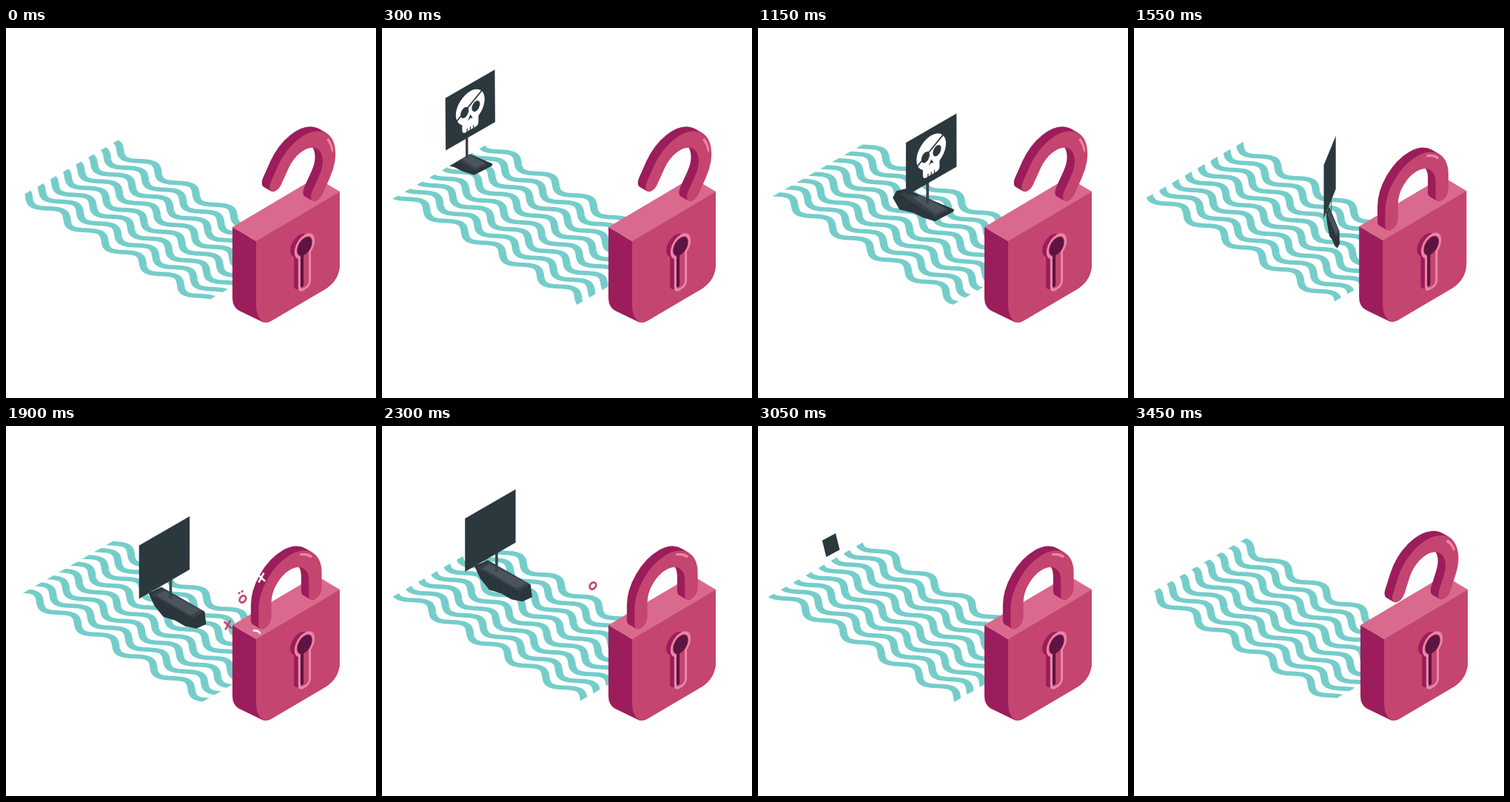
These frames come from a looping animation (500 by 500 pixels, 3500 ms). An HTML page with a canvas:

```html
<!DOCTYPE html>
<html lang="en">
<head>
<meta charset="utf-8">
<title>Padlock and pirate ship</title>
<style>
html, body { margin: 0; width: 100%; height: 100%; overflow: hidden; background: #fff; }
canvas { display: block; width: 500px; height: 500px; }
</style>
</head>
<body>
<canvas id="stage" width="500" height="500"></canvas>
<script>
const ctx = document.getElementById('stage').getContext('2d');
const LOOP = 3500;
const TAU = Math.PI * 2;
const COS = Math.cos(Math.PI / 6);
const COLOR = {
  water: '#75cdca', front: '#c4456f', side: '#9c1d5b', top: '#d9698d',
  rim: '#e985a6', hole: '#5e1441', flag: '#2b383d', hull: '#2b363c',
  deck: '#38424b', plank: '#4b545d'
};

const clamp01 = v => Math.max(0, Math.min(1, v));
const span = (t, a, b) => clamp01((t - a) / (b - a));
const easeOut = p => 1 - (1 - p) ** 3;

function group(draw) {
  ctx.save();
  draw();
  ctx.restore();
}

function fillPath(path, color) {
  ctx.fillStyle = color;
  ctx.fill(path);
}

function polygon(points, color) {
  ctx.beginPath();
  points.forEach(([x, y]) => ctx.lineTo(x, y));
  ctx.closePath();
  ctx.fillStyle = color;
  ctx.fill();
}

// Isometric planes: the water surface and the wall facing the viewer.
const groundPlane = () => ctx.transform(COS, 0.5, COS, -0.5, 24.3, 225);
const wallPlane = (x, y) => ctx.transform(COS, -0.5, 0, 1, x, y);

function clipGround(length, from, to) {
  group(() => {
    groundPlane();
    ctx.beginPath();
    ctx.rect(0, from, length, to - from);
  });
  ctx.clip();
}

function drawWater(t) {
  const length = 287, period = 59.1, amp = 7.9;
  const zero = 67.2 - 5 * period * t / LOOP;
  group(() => {
    clipGround(length, -30, 170);
    groundPlane();
    ctx.strokeStyle = COLOR.water;
    ctx.lineWidth = 8.3;
    for (let row = 0; row < 8; row++) {
      ctx.beginPath();
      for (let s = -20; s <= length + 20; s += 1.5) {
        ctx.lineTo(s, row * 19.3 - amp * Math.sin(TAU * (s - zero - row) / period));
      }
      ctx.stroke();
    }
  });
}

const HULL_OUT = {
  hull: [[-47, -8], [-42, -17], [-30, -20], [36, 8], [35, 11], [10, 24], [-6, 19], [-18, 13], [-38, 8]],
  deck: [[-38, -13], [-28, -16], [29, 9], [11, 18]],
  plank: [[-20, -8], [-10, -11], [26, 7], [11, 14]]
};
const HULL_BACK = {
  hull: [[-30, -8], [-12, -16], [46, 17], [48, 34], [35, 40], [20, 37], [6, 29], [-10, 24], [-22, 9]],
  deck: [[-26, -6], [-10, -14], [45, 17], [30, 26]],
  plank: [[-19, -5], [-9, -11], [40, 15], [27, 22]]
};

function drawSkull() {
  ctx.fillStyle = '#fff';
  ctx.beginPath();
  ctx.ellipse(0, -4, 23, 22, 0, 0, TAU);
  ctx.fill();
  ctx.beginPath();
  ctx.roundRect(-13, 8, 26, 19, 5);
  ctx.fill();
  ctx.fillStyle = ctx.strokeStyle = COLOR.flag;
  for (const x of [-9, 9]) {
    ctx.beginPath();
    ctx.ellipse(x, -1, 6.5, 7, 0, 0, TAU);
    ctx.fill();
  }
  polygon([[0, 6], [4, 13], [0, 11], [-4, 13]], COLOR.flag);
  ctx.lineWidth = 2.5;
  ctx.beginPath();
  ctx.moveTo(19, -18);
  ctx.lineTo(-22, 5);
  ctx.stroke();
  ctx.lineWidth = 1.5;
  for (const x of [-5, 0, 5]) {
    ctx.beginPath();
    ctx.moveTo(x, 23);
    ctx.lineTo(x, 28);
    ctx.stroke();
  }
}

function shipState(t) {
  const hit = 1430, leave = 1640;
  let travel;
  if (t < hit) travel = 58 + 0.1345 * (t - 600);
  else if (t < leave) travel = 169.6;
  else if (t < 2300) travel = 58 + 111.6 * (2300 - t) / (2300 - leave);
  else travel = 58 - 0.135 * (t - 2300);
  travel = Math.max(3, travel);
  const out = span(t, 2730, 3195);
  const size = t < hit ? easeOut(span(t, 140, 360)) : 1 - out;
  const turn = span(t, hit, leave);
  return {
    x: 97 + travel + 8 * out,
    y: 166 + travel * 0.54 + 16 * out,
    size,
    hullSize: clamp01(2 * size - 1),
    lean: 0.36 * (1 - size),
    squash: Math.max(0.03, Math.abs(Math.cos(Math.PI * turn))),
    back: turn > 0.5
  };
}

function drawShip(t) {
  const ship = shipState(t);
  if (ship.size <= 0.01) return;
  const place = size => {
    ctx.translate(ship.x, ship.y);
    ctx.transform(1, ship.lean / 2, ship.lean, 1, 0, 0);
    ctx.scale(size * ship.squash, size);
  };
  const parts = ship.back ? HULL_BACK : HULL_OUT;
  group(() => {
    clipGround(400, -100, 300);
    place(ship.hullSize);
    for (const name in parts) polygon(parts[name], COLOR[name]);
  });
  group(() => {
    place(ship.hullSize);
    ctx.fillStyle = COLOR.deck;
    ctx.fillRect(-1.8, -50, 3.6, 50);
  });
  group(() => {
    place(ship.size);
    wallPlane(ship.back ? -8.5 : 5, ship.back ? -56 : -66);
    ctx.fillStyle = COLOR.flag;
    ctx.fillRect(-39.5, -36, 79, 72);
    if (!ship.back) drawSkull();
  });
}

const BODY = new Path2D('M306 269L338 288L451 221V318Q451 341 431 353L358 396Q350 400 344 396L315 382Q306 377 306 365Z');
const FRONT = new Path2D('M338 288L451 221V318Q451 341 431 353L358 396Q353 398.500 349 398Q338 392 338 375Z');
const LID = new Path2D('M306 269L419 202L451 221L338 288Z');

function keyhole(r, left, right, bottom, round) {
  const path = new Path2D();
  path.arc(0, 0, r, Math.PI - Math.acos(-left / r), TAU + Math.acos(right / r));
  path.lineTo(right, bottom - round);
  path.quadraticCurveTo(right, bottom, right - round, bottom);
  path.lineTo(left + round, bottom);
  path.quadraticCurveTo(left, bottom, left, bottom - round);
  path.closePath();
  return path;
}
const HOLE = keyhole(14, -8.2, 8.2, 57, 7);
const HOLE_DARK = keyhole(11.5, -6.5, -1.5, 53, 2);

function drawKeyhole() {
  for (let i = 9; i >= 0; i--) group(() => {
    wallPlane(403.5 - i * 0.8, 295 - i * 0.15);
    fillPath(HOLE, COLOR.side);
  });
  group(() => {
    wallPlane(403.5, 295);
    fillPath(HOLE, COLOR.front);
    fillPath(HOLE_DARK, COLOR.hole);
    ctx.strokeStyle = COLOR.rim;
    ctx.lineWidth = 3.6;
    ctx.stroke(HOLE);
  });
}

const ARCH = 39.3, LEG = 20;
const SHACKLE = new Path2D();
SHACKLE.moveTo(0, 0);
SHACKLE.lineTo(0, -LEG);
SHACKLE.arc(-ARCH, -LEG, ARCH, 0, Math.PI, true);
SHACKLE.lineTo(-2 * ARCH, 0);

function drawShackle(t) {
  const open = t < 1430 ? 1 - span(t, 1250, 1420) ** 2 : span(t, 3300, 3500) ** 1.35;
  ctx.lineCap = 'round';
  for (let i = 12; i >= 0; i--) group(() => {
    wallPlane(418 + 2.5 * open - i * COS, 224 - open - i * 0.5);
    ctx.rotate(open * 35 * Math.PI / 180);
    ctx.strokeStyle = i ? COLOR.side : COLOR.front;
    ctx.lineWidth = 20;
    ctx.stroke(SHACKLE);
    if (i) return;
    ctx.strokeStyle = COLOR.rim;
    ctx.lineWidth = 3;
    ctx.beginPath();
    ctx.arc(-ARCH, -LEG, 45, -1.2, -0.75);
    ctx.stroke();
  });
}

function drawLock(t) {
  const bump = t >= 1430 && t < 1780 ? 3 * (1 - span(t, 1430, 1780)) * Math.sin((t - 1430) / 28) : 0;
  const strain = t > 3140 && t < 3320 ? 2.5 * Math.sin(Math.PI * span(t, 3140, 3320)) * Math.sin((t - 3140) / 22) : 0;
  const shake = bump + strain;
  group(() => {
    ctx.translate(shake, shake * 0.5);
    fillPath(BODY, COLOR.side);
    fillPath(FRONT, COLOR.front);
    fillPath(LID, COLOR.top);
    drawKeyhole();
    drawShackle(t);
  });
}

// Positions are those at 1900 ms; all sparks drift back along the water.
const SPARKS = [
  { kind: 'cross', x: 300, y: 269, color: COLOR.front, from: 1600, to: 2100 },
  { kind: 'ring', x: 320, y: 234, color: COLOR.front, from: 1640, to: 2400 },
  { kind: 'dots', x: 317, y: 225, color: COLOR.front, from: 1700, to: 2050 },
  { kind: 'cross', x: 345, y: 205, color: '#fff', from: 1760, to: 2020 },
  { kind: 'dash', x: 339, y: 278, color: '#fff', from: 1780, to: 2000 }
];
const SPARK_SHAPES = {
  cross: new Path2D('M-4.500 -4L4.500 4M3 -5.500L-3 5.500'),
  ring: new Path2D('M3 -4C7 -1 1 7 -3 4C-7 1 -1 -7 3 -4Z'),
  dots: new Path2D('M-2 1L-1.500 0.700M2 -1.200L2.500 -1.500'),
  dash: new Path2D('M-4 -1.500Q2 -2 4 2')
};

function drawSparks(t) {
  for (const s of SPARKS) {
    if (t < s.from || t > s.to) continue;
    const size = Math.min(span(t, s.from, s.from + 90), 1 - span(t, s.to - 80, s.to));
    group(() => {
      ctx.translate(s.x - 0.0875 * (t - 1900), s.y - 0.045 * (t - 1900));
      ctx.scale(size, size);
      ctx.strokeStyle = s.color;
      ctx.lineWidth = 2.7;
      ctx.lineCap = 'round';
      ctx.stroke(SPARK_SHAPES[s.kind]);
    });
  }
}

function render(t) {
  ctx.fillStyle = '#fff';
  ctx.fillRect(0, 0, 500, 500);
  drawWater(t);
  drawShip(t);
  drawLock(t);
  drawSparks(t);
}

const start = performance.now();
function tick() {
  render((performance.now() - start) % LOOP);
  requestAnimationFrame(tick);
}
tick();
</script>
</body>
</html>
```
